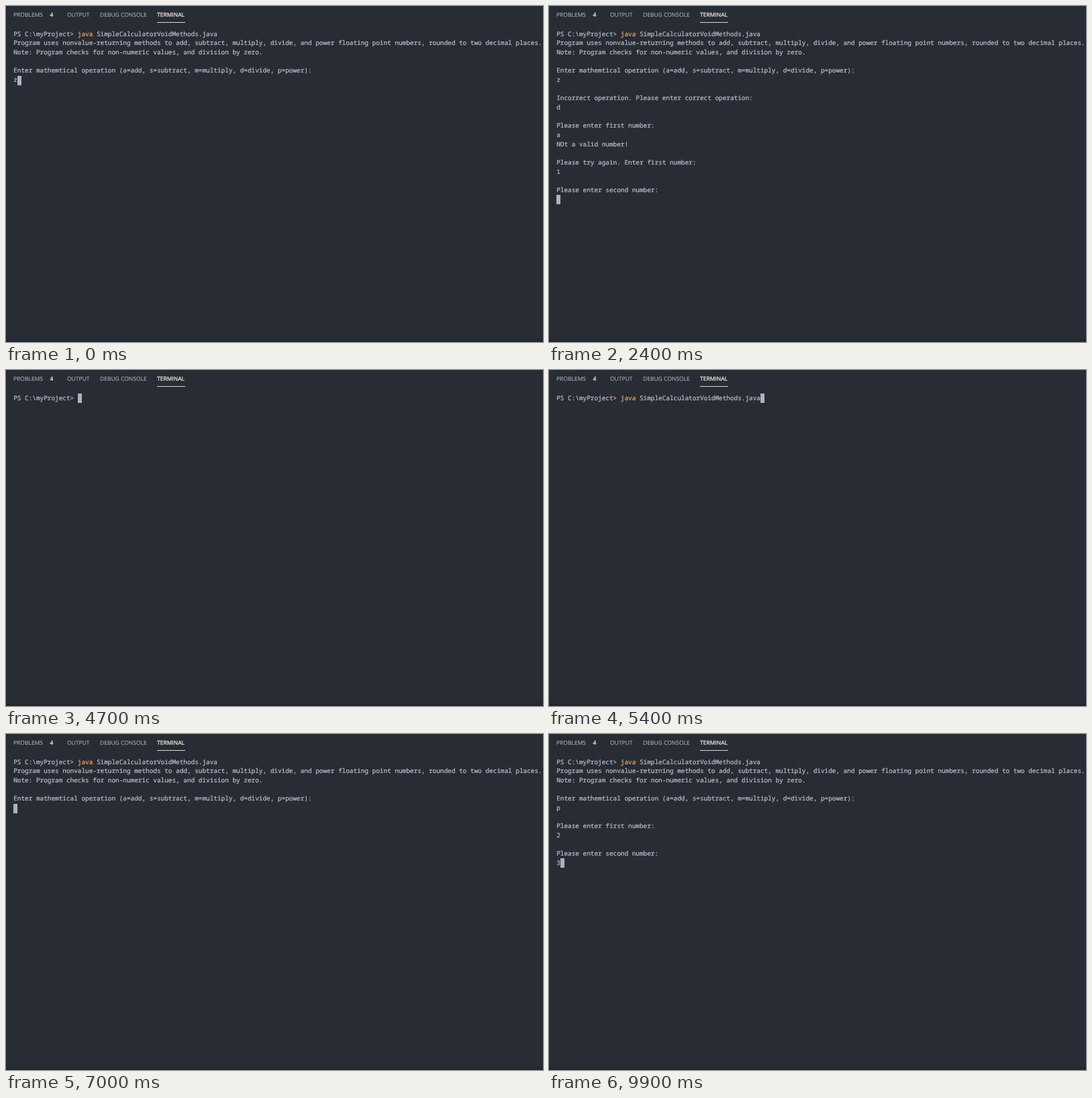
Recreate the animation shown at these times as an HTML page. Size 800 by 500 pixels, loop 10000 ms.

```html
<!DOCTYPE html>
<html lang="en">
<head>
<meta charset="utf-8">
<title>Terminal session</title>
<style>
  html, body { margin: 0; width: 100%; height: 100%; overflow: hidden; background: #282c34; }
  body { text-rendering: geometricPrecision; }
  #stage { position: relative; width: 800px; height: 500px; overflow: hidden; background: #282c34; }
  #stage > * { position: absolute; }
  .tab { top: 7px; font: 8.5px/14px "Open Sans", sans-serif; color: #aeb0b4; white-space: pre; -webkit-text-stroke: 0.1px; }
  .count { color: #f3e9b8; font-weight: 600; }
  .active { color: #fff8ea; -webkit-text-stroke: 0.2px; }
  #underline { left: 225px; top: 24px; width: 42px; height: 1px; background: #e0d6c2; }
  #output {
    left: 11.2px; top: 34.7px; margin: 0; color: #b9c0cc;
    font: 9.385px/13.66px "Noto Sans Mono", monospace;
    -webkit-text-stroke: 0.22px;
  }
  #output b { font-weight: normal; color: #f0a85f; }
  #cursor { width: 6px; height: 14px; background: #abb2bf; }
  #footer { left: 0; top: 496px; width: 800px; height: 4px; background: #23262e; }
</style>
</head>
<body>
<div id="stage">
  <span class="tab" style="left:11px">PROBLEMS</span>
  <span class="tab count" style="left:65.5px">4</span>
  <span class="tab" style="left:91px">OUTPUT</span>
  <span class="tab" style="left:140px">DEBUG CONSOLE</span>
  <span class="tab active" style="left:225px">TERMINAL</span>
  <div id="underline"></div>
  <pre id="output"></pre>
  <div id="cursor"></div>
  <div id="footer"></div>
</div>
<script>
const LOOP = 10000;
const CELL = { left: 11, top: 35.2, width: 5.631, height: 13.66 };

const PROMPT = 'PS C:\\myProject> ';
const COMMAND = 'java SimpleCalculatorVoidMethods.java';
const INTRO =
  'Program uses nonvalue-returning methods to add, subtract, multiply, divide, and power ' +
  'floating point numbers, rounded to two decimal places.\n' +
  'Note: Program checks for non-numeric values, and division by zero.\n\n' +
  'Enter mathemtical operation (a=add, s=subtract, m=multiply, d=divide, p=power):\n';
const ask = which => `\n\nPlease enter ${which} number:\n`;
const retry = which => `\nNOt a valid number!\n\nPlease try again. Enter ${which} number:\n`;
const CLEAR = '\f';

// Each entry appends terminal output at its time in ms.
const session = [
  [0, PROMPT + COMMAND + '\n' + INTRO + 'z'],
  [300, '\n\nIncorrect operation. Please enter correct operation:\n'],
  [600, 'd'],
  [900, ask('first')],
  [1200, 'a'],
  [1500, retry('first')],
  [1800, '1'],
  [2100, ask('second')],
  [2600, 'b'],
  [2900, retry('second')],
  [3300, '0'],
  [3600, '\n\nCannot divide by zero!\n' + PROMPT],
  [4700, CLEAR + PROMPT],
  [5200, COMMAND],
  [5600, '\n'],
  [6200, INTRO],
  [8400, 'p'],
  [8700, ask('first')],
  [9000, '2'],
  [9300, ask('second')],
  [9700, '3']
];

const output = document.getElementById('output');
const cursor = document.getElementById('cursor');
let shown = null;

function screenAt(time) {
  const text = session.filter(([start]) => start <= time).map(([, part]) => part).join('');
  return text.slice(text.lastIndexOf(CLEAR) + 1);
}

function show(text) {
  const [before, after] = text.split('java ');
  output.textContent = before;
  if (after !== undefined) {
    const keyword = document.createElement('b');
    keyword.textContent = 'java';
    output.append(keyword, ' ' + after);
  }
  const lines = text.split('\n');
  const row = lines.length - 1;
  const column = lines[row].length;
  cursor.style.left = Math.round(CELL.left + column * CELL.width) + 'px';
  cursor.style.top = Math.round(CELL.top + row * CELL.height) + 'px';
}

function frame() {
  const text = screenAt(performance.now() % LOOP);
  if (text !== shown) show(shown = text);
  requestAnimationFrame(frame);
}
frame();
</script>
</body>
</html>
```
